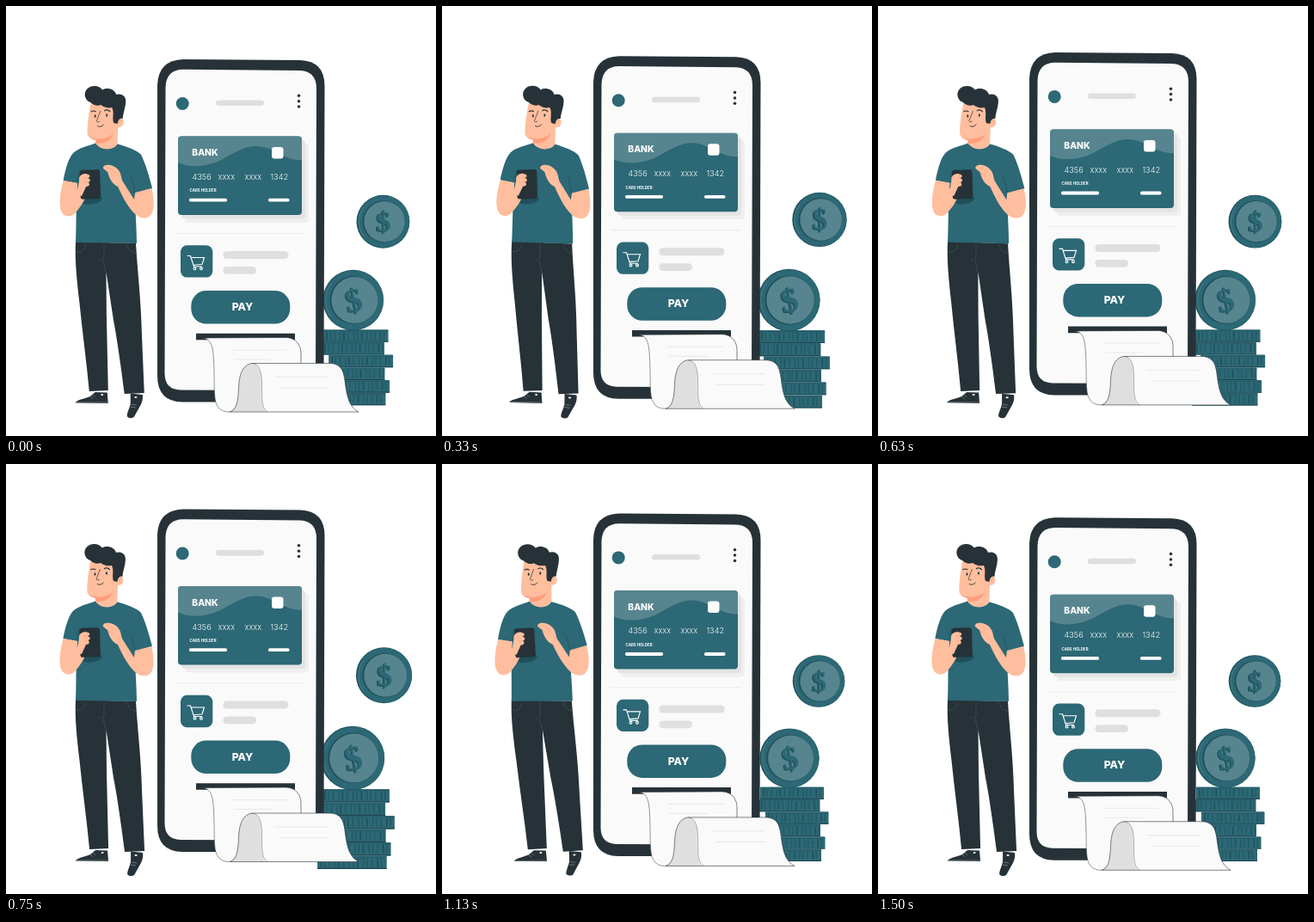
An HTML page with a canvas for the animation above (1.54 s loop, 500 px wide and 500 px high).

```html
<!DOCTYPE html>
<html lang="en">
<head>
<meta charset="utf-8">
<title>Mobile payment</title>
<style>
html, body { margin: 0; width: 100%; height: 100%; overflow: hidden; background: #fff; }
canvas { display: block; width: 500px; height: 500px; }
</style>
</head>
<body>
<canvas id="stage"></canvas>
<script>
const TEAL = '#2c6875', DEEP = '#20505b', PALE = '#57858f';
const DARK = '#263238', SKIN = '#ffbe9d', BLUSH = '#ff9d7c', GRAY = '#dfdfdf', PAPER = '#fafafa';
const LOOP = 1540, STEP = 1000 / 24, PHASE = 30;

const canvas = document.getElementById('stage');
const ctx = canvas.getContext('2d');
const ratio = window.devicePixelRatio || 1;
canvas.width = canvas.height = 500 * ratio;

function fill(d, color) {
  ctx.fillStyle = color;
  ctx.fill(new Path2D(d));
}
function line(d, color, width = 0.8) {
  ctx.strokeStyle = color;
  ctx.lineWidth = width;
  ctx.stroke(new Path2D(d));
}
function box(x, y, w, h, r, color) {
  ctx.fillStyle = color;
  ctx.beginPath();
  ctx.roundRect(x, y, w, h, r);
  ctx.fill();
}
function disc(x, y, r, color, ry = r) {
  ctx.fillStyle = color;
  ctx.beginPath();
  ctx.ellipse(x, y, r, ry, 0, 0, 7);
  ctx.fill();
}
function text(s, x, y, font, color = '#fff', align = 'left') {
  ctx.font = font;
  ctx.fillStyle = color;
  ctx.textAlign = align;
  ctx.fillText(s, x, y);
}
function group(draw) {
  ctx.save();
  draw();
  ctx.restore();
}

// Linear interpolation through [position, value] stops.
function track(p, stops) {
  for (let i = 1; i < stops.length; i++) {
    const [a, from] = stops[i - 1], [b, to] = stops[i];
    if (p <= b) return from + (to - from) * (p - a) / (b - a);
  }
  return stops[stops.length - 1][1];
}
const FLOAT = [[0, 0], [0.5, -10], [1, 0]];
const SWAY = [[0, 0], [0.25, 1], [0.75, -1], [1, 0]];
const BEAT = [[0, 1], [0.1, 1.1], [0.3, 1], [0.4, 1], [0.5, 1.08], [0.6, 1], [1, 1]];

function coin(x, y, r, tilt) {
  disc(x, y, r, DEEP);
  disc(x + 0.6, y, r - 0.6, TEAL);
  line(`M${x - r * 0.72} ${y - r * 0.55}A${r * 0.9} ${r * 0.9} 0 0 0 ${x - r * 0.72} ${y + r * 0.55}`, PALE, 0.6);
  disc(x + 0.6, y, r * 0.79, DEEP);
  disc(x + 1.6, y, r * 0.765, PALE);
  group(() => {
    ctx.translate(x, y);
    ctx.rotate(tilt);
    const font = `bold ${r * 1.1}px "Liberation Serif", serif`;
    text('$', -0.8, r * 0.37 + 0.8, font, DEEP, 'center');
    text('$', 0.8, r * 0.37, font, TEAL, 'center');
  });
}

function coins() {
  const rows = [[370, 444], [368, 439.5], [376, 449.5], [369, 440], [372, 445.5], [366, 441]];
  rows.forEach(([left, right], i) => {
    const y = 375.5 + i * 14.42;
    box(left, y, right - left, 14.4, 1, TEAL);
    for (let x = left + 4, n = 0; x < right - 1; x += 4 + (n++ % 3) * 1.1)
      line(`M${x} ${y + 2.5}v9.5`, DEEP, n % 4 ? 0.8 : 1.5);
    line(`M${left} ${y + 13.9}H${right}`, '#1d444e', 1);
    line(`M${left} ${y + 1.6}H${right}`, DEEP, 0.5);
  });
  coin(404, 342, 34.6, -0.18);
  coin(438, 252.5, 30.3, 0);
}

function card() {
  box(208, 160, 144, 92, 4, '#efefef');
  box(204, 156, 144, 91.5, 4, '#e4e4e4');
  group(() => {
    ctx.beginPath();
    ctx.roundRect(200, 151.5, 144, 91.5, 4);
    ctx.clip();
    box(200, 151, 144, 93, 0, TEAL);
    fill('M200 151V182C215 189 235 187 252 178C268 169 282 160 299 164C316 168 326 180 344 179V151Z', PALE);
  });
  text('BANK', 216.3, 174.2, '800 10.3px Inter, sans-serif');
  box(309, 164, 13.5, 13.5, 3, '#fff');
  const font = '300 9.2px Inter, sans-serif';
  text('4356', 216.5, 202, font, '#f3f7f8');
  text('xxxx', 246.5, 202, font, '#f3f7f8');
  text('xxxx', 277.5, 202, font, '#f3f7f8');
  text('1342', 307.5, 202, font, '#f3f7f8');
  text('CARS HOLDER', 213.5, 216.4, '700 4.4px Inter, sans-serif');
  box(213, 223.7, 44, 3.8, 1.6, '#fff');
  box(305, 223.7, 24.5, 3.8, 1.6, '#fff');
}

function receipt() {
  box(221, 380.7, 115, 7.6, 0, DARK);
  const sheet = 'M229 386C238 387 240 395 241 405C243 430 241 450 244 461C247 470 253 472 260 472H300L343 420V404C343 394 337 386 326 385.5Z';
  fill(sheet, PAPER);
  line('M229 386C238 387 240 395 241 405C243 430 241 450 244 461C247 470 253 472 260 472', DARK, 0.5);
  line('M229 386L326 385.5C337 386 343 394 343 404V416', DARK, 0.6);
  line('M262 400H327M265 411H308', '#e4e4e4');
  fill('M286 415.5C275 417 271 429 270.5 444C270 460 268 469 259 472H302C294 465 298 440 296 428C294 420 291 416 286 415.5Z', GRAY);
  const front = 'M286 415.5C295 416 297 426 297.5 438C298 454 296 467 304 472H410C395 464 396 444 393 430C391 420 386 416 377 415.5Z';
  fill(front, PAPER);
  line('M260 472C268 470 270 460 270.5 444C271 429 275 417 286 415.5H377C386 416 391 420 393 430C396 444 395 464 410 472H260', DARK, 0.6);
  line('M286 415.5C295 416 297 426 297.5 438C298 454 296 467 304 472', DARK, 0.4);
  line('M312 431.5H375M318 444H376', '#e4e4e4');
}

function device() {
  fill('M206 62L342 63Q370.5 64 370.5 93L369.5 430Q369 460 340 460.5H205Q176 460 176 430V92Q177 63 206 62Z', DARK);
  fill('M206 73.8L340 75Q361 75 361 96L360 428Q360 447 341 447L203 446.5Q184.5 446 184.5 427L185.5 95Q186 74 206 73.8Z', PAPER);
  disc(205.2, 113.5, 7.5, TEAL);
  box(244, 109.5, 56, 6.6, 3.3, GRAY);
  for (const y of [104.3, 110.7, 117]) disc(340.5, y, 1.75, DARK);
  card();
  line('M196 264.5H348', '#e8e8e8');
  box(203, 278.3, 37.3, 37.3, 7.5, TEAL);
  line('M210.5 290.5H214.5L218.5 303H228M215.2 292.5H230.5L228 300.5L218 301.2', '#fff', 1.15);
  for (const x of [219.5, 227]) {
    ctx.beginPath();
    ctx.arc(x, 305.3, 1.4, 0, 7);
    ctx.stroke();
  }
  box(252.5, 285, 76, 9, 4.2, GRAY);
  box(252.5, 303, 38.5, 8.8, 4.2, GRAY);
  box(215.3, 331, 115, 38.5, 17.5, TEAL);
  text('PAY', 275, 354.2, '800 12.3px Inter, sans-serif', '#fff', 'center');
  receipt();
}

function legs() {
  fill('M81 274L151 276C153 310 157 340 158 380L161 450L138 451C134 420 129 385 125 365L116.5 309L117 360L119 447L97 448C94 415 89 380 85.5 345C82 315 80 295 81 274Z', DARK);
  line('M114 277V291C114 295 111 296 108 295M82 286C88 287 92 283 93 277M141 277C142 283 146 287 151 287M116 309L113 296', '#455a64', 0.6);
  fill('M104 449L118 449.5L119 462L81 461.5C82 458 91 457 98 454Z', DARK);
  line('M98 454L101 457M101 452L104 455M81 461H119', '#8a979c', 0.6);
  fill('M145 450.5L159 452C160 459 157 464 154 469L149 478C146 480 142 479 141 477C141 472 145 466 145 461Z', DARK);
  line('M146 463L152 464M145 466L151 467', '#9aa5aa', 0.6);
  disc(112, 452, 1.5, '#fff', 1);
  disc(151, 455, 1.6, '#fff', 1);
}

function head() {
  fill('M99 110C96 124 94 140 94.5 149C96 154 101 155 104 156V161C110 169 124 168 129.5 161L130 141C139 142 138 128 131 131L132 111Z', SKIN);
  fill('M97 152C106 157 119 154 125 148C120 159 112 161 104 159.5V156C101 155 98 154 97 152Z', BLUSH);
  fill('M98 112C91 110 89 100 95 95.5C101 91 109 93 112 97.5C117 94.5 126 96 128 103C133 101 139 104 139 110C139 118 136 124 135.5 131C132 130 130 133 129.5 137L125 136C123 130 126 124 123 118C119 119 114 118 110 115C106 117 101 115 98 112Z', DARK);
  disc(103.5, 128, 1, DARK, 1.8);
  disc(117, 127, 1, DARK, 1.8);
  line('M98.5 123C101 121.5 103 122 104.5 123M114 122C116 120.5 119 121 121 123', DARK, 1.1);
  line('M109.5 122C108 127 106 131 105 134C106 135.5 108 135 109 134', DARK, 0.7);
  line('M106 139.5C109 141 112 140 113.5 137.5', DARK, 0.9);
  line('M131.5 136C132 133 134 132 135 133', BLUSH, 0.8);
}

function man() {
  legs();
  head();
  fill('M150 215L169 211C172 224 173 237 168 243C163 249 154 246 149 241C141 233 135 219 129 209L135 202L150 222Z', SKIN);
  fill('M67 202C63 216 61 231 64.5 239C67 245 74 246 79 242C87 234 93 221 96 209L85 207L82 213L83 204Z', SKIN);
  fill('M104 159.5C110 169 125 168 129.5 160.5C139 163 153 168 157 173C162 183 167 200 170 212L150 218C150 239 152 257 152 276L81 275C82 252 81 227 83 206L66.5 203C69 189 73 176 78 171C84 165 95 163 104 159.5Z', TEAL);
  line('M150 218C149 211 147 204 145 198M83 206L85 192', DEEP, 0.7);
  fill('M88 224L109 220L112 224C109 230 98 232 90 230Z', DEEP);
  fill('M67 203C63 216 61 231 64.5 239C67 245 74 246 79 242C87 234 93 224 95 214L87 206L82 214L83 206Z', SKIN);
  group(() => {
    ctx.translate(97.5, 207.5);
    ctx.rotate(-0.035);
    box(-11.5, -17, 23.5, 34, 3, DARK);
  });
  fill('M85 203C84 197 90 194 94 195.5C98 196 98.5 199 95 200C98 201 99 204 95.5 205C98 207 97 210 93 210L88 221L82 220Z', SKIN);
  line('M95 200H91M95.5 205H91', BLUSH, 0.6);
  fill('M150 217L169 212C172 224 173 237 168 243C163 249 154 246 149 241C141 233 135 221 130 210C123 207 120 200 118 193L113 189C112 186 116 184 121 185C127 186 132 191 133 195L135 203L149 225Z', SKIN);
  line('M117 188L123 190L126 194M119 194L125 197', BLUSH, 0.6);
}

function draw(ms) {
  const frame = Math.floor((ms % LOOP + 2) / STEP);
  const p = (frame * STEP + PHASE) % LOOP / LOOP;
  ctx.setTransform(ratio, 0, 0, ratio, 0, 0);
  box(0, 0, 500, 500, 0, '#fff');
  group(() => {
    const s = track(p, BEAT);
    ctx.translate(418, 342.5);
    ctx.scale(s, s);
    ctx.translate(-418, -342.5);
    coins();
  });
  group(() => {
    ctx.translate(0, track(p, FLOAT) + 0.4);
    device();
  });
  group(() => {
    ctx.translate(118, 286);
    ctx.rotate(track(p, SWAY) * Math.PI / 180);
    ctx.translate(-118, -286);
    man();
  });
}

const start = performance.now();
function tick() {
  draw(performance.now() - start);
  requestAnimationFrame(tick);
}
tick();
</script>
</body>
</html>
```
